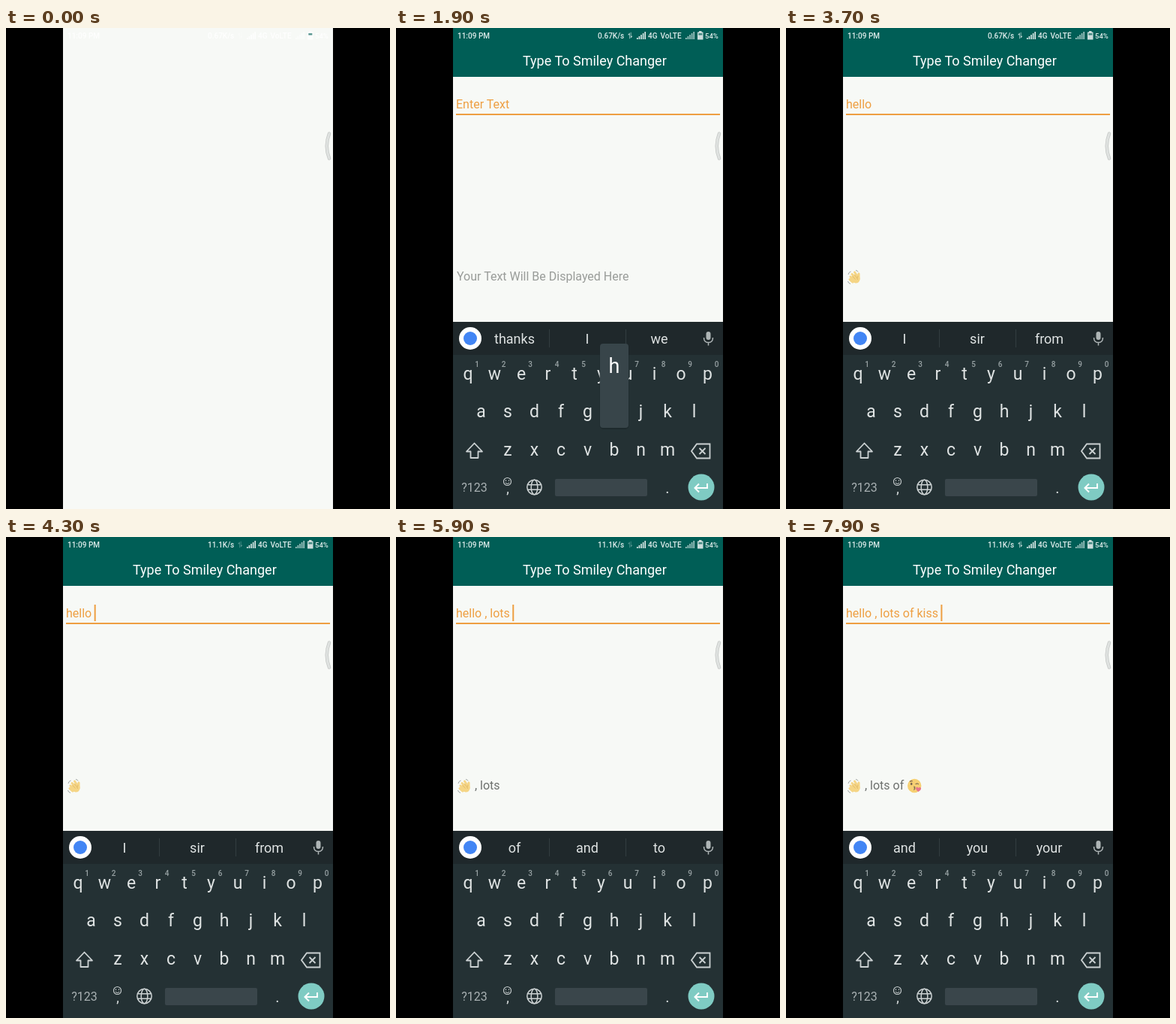
These frames come from a looping animation (512x640 px, 8 s). An HTML page:

```html
<!DOCTYPE html>
<html lang="en">
<head>
<meta charset="utf-8">
<title>Typing demo</title>
<style>
html, body { margin: 0; width: 100%; height: 100%; overflow: hidden; background: #000; }
svg { display: block; width: 100%; height: 100%; font-family: Roboto, sans-serif; }
text { white-space: pre; }
.mid { text-anchor: middle; }
.line { fill: none; stroke: #ccd2d3; stroke-width: 1.8; }
</style>
</head>
<body>
<svg viewBox="0 0 512 640">
  <defs>
    <clipPath id="screen"><rect x="76" width="360" height="640"/></clipPath>
    <g id="bars">
      <path d="M0 15v-2h1.6v2zM2.6 15v-4h1.6v4zM5.2 15v-6h1.6v6zM7.8 15V7h1.6v8zM10.4 15V5H12v10z"/>
    </g>
    <g id="wave" opacity=".85">
      <path d="M5 10L10 16M7 6.500L13 13M10.500 4L15 11M16 6L16 13M4 13.500L8 17" stroke="#f5cf72" stroke-width="3" stroke-linecap="round"/>
      <path d="M6 10L14 6.500Q18 9 17.500 14Q16 19 11.500 18.500Q8 17.500 5 14z" fill="#f5cf72"/>
      <path d="M7.500 9L11.500 13.500M10 7L14 12M15 9Q13 12 14.500 14" fill="none" stroke="#d9a94c" stroke-width=".8"/>
      <path d="M2 7Q2.500 4 5.500 3M12 1.500Q14 1.500 15 3.500M1.500 16Q2 18.500 5 19.500" fill="none" stroke="#8f9694" stroke-width="1"/>
    </g>
    <g id="kiss" opacity=".88">
      <circle cx="10" cy="10" r="9.200" fill="#f6cb62"/>
      <ellipse cx="6" cy="7.500" rx="1.300" ry="1.700" fill="#66503a"/>
      <path d="M11.500 8Q13.500 6 15.500 8M4 4.500Q5.500 3 7.500 4M9 11Q12 11.500 9.800 13Q12 14 9 15.500" fill="none" stroke="#66503a" stroke-width="1.100"/>
      <path d="M15 18Q10.500 14 12.500 12Q14.300 11 15.200 13Q17 11 18.800 12.700Q19.500 15.500 15 18z" fill="#e4647d"/>
    </g>
  </defs>
  <rect width="512" height="640"/>
  <g clip-path="url(#screen)">
    <rect x="76" width="360" height="640" fill="#f7f9f6"/>
    <g id="app">
      <rect x="76" width="360" height="65" fill="#005e56"/>
      <text x="169" y="49.500" font-size="18" fill="#fff">Type To Smiley Changer</text>
      <text id="input" x="80" y="107" font-size="16" fill="#ee9f42"></text>
      <rect x="80" y="114" width="352" height="2" fill="#ee9f42"/>
      <rect id="caret" y="90" width="2" height="22" fill="#ee9f42"/>
      <g id="output" font-size="16"></g>
      <rect x="76" y="592" width="360" height="48" fill="#005e56"/>
      <text class="mid" x="256.500" y="621" font-size="14" font-weight="500" fill="#fff">SHARE</text>
    </g>
    <g id="status" font-size="10" font-weight="500" fill="#fff">
      <text x="82" y="13.500">11:09 PM</text>
      <text id="speed" x="269" y="13.500"></text>
      <path id="arrows" d="M311 14V9h-2l2.700-3v8zM313.500 5.500v5h2l-2.700 3v-8z" transform="translate(0 .3)"/>
      <use href="#bars" x="321"/>
      <text x="336" y="13.500">4G</text>
      <text x="352.500" y="13.500">VoLTE</text>
      <use href="#bars" x="386" opacity=".75"/>
      <path d="M402 15.500V5.500h2v-1.500h3.500v1.500h2v10z" opacity=".9"/>
      <path d="M403.300 7h5v2.500h-5z" fill="#4d8e88"/>
      <text x="412" y="13.500" font-size="9.500">54%</text>
    </g>
    <path d="M431 140.500Q424.500 157 431 173.500" fill="none" stroke="#c3c6c4" stroke-width="4.500" stroke-linecap="round"/>
    <path d="M431 140.500Q424.500 157 431 173.500" fill="none" stroke="#dfe2e0" stroke-width="3" stroke-linecap="round"/>
    <g id="board">
      <rect x="76" y="391" width="360" height="249" fill="#243134"/>
      <rect x="76" y="391" width="360" height="44" fill="#1f282b"/>
      <circle cx="99" cy="413" r="15" fill="#fff"/>
      <circle cx="99" cy="413" r="9" fill="#4285f4"/>
      <path d="M204.500 401v24M306.500 401v24" stroke="#323d40"/>
      <g id="words" font-size="18" fill="#dfe3e3"></g>
      <rect x="413.500" y="404" width="6" height="11" rx="3" fill="#aeb5b6"/>
      <path d="M410.500 412q0 6.500 6 6.500t6-6.500M416.500 418.500v4" class="line" style="stroke:#aeb5b6;stroke-width:1.500"/>
      <rect id="erase" x="384" y="541" width="48" height="43" rx="4" fill="#37444a"/>
      <g id="keys"></g>
      <path class="line" d="M104.500 552.500l10.500 11h-5.500v8.500h-10v-8.500h-5.500z" stroke-linejoin="round"/>
      <path class="line" d="M401 553.500h17.500v19H401l-7-9.500zM404.500 559l8 8m0-8l-8 8"/>
      <text class="mid" x="104.500" y="617" font-size="16" fill="#a9b1b3">?123</text>
      <circle class="line" cx="148.500" cy="603.500" r="5" style="stroke-width:1.100"/>
      <path class="line" d="M146 605q2.500 3 5 0M146.500 601.500v1.500M150.500 601.500v1.500" style="stroke-width:1.100"/>
      <text class="mid" x="149" y="619" font-size="18" fill="#dfe3e3">,</text>
      <g class="line" style="stroke-width:1.500">
        <circle cx="184.500" cy="611" r="9.700"/>
        <ellipse cx="184.500" cy="611" rx="4.300" ry="9.700"/>
        <path d="M175.500 607.700h18M175.500 614.300h18"/>
      </g>
      <rect id="space" x="212" y="600" width="123" height="23" rx="2"/>
      <text class="mid" x="362" y="619" font-size="20" fill="#dfe3e3">.</text>
      <circle cx="407" cy="611" r="17.500" fill="#7fcbc3"/>
      <path d="M415 606v6h-16M404 606.500l-5.500 5.500 5.500 5.500" fill="none" stroke="#fff" stroke-width="2"/>
      <g id="popup">
        <rect x="-19.500" y="-91" width="39" height="114" rx="5" fill="#1b2629" opacity=".6"/>
        <rect x="-19" y="-91" width="38" height="112" rx="4" fill="#38454a"/>
        <text id="big" class="mid" y="-52" font-size="27" fill="#fff"></text>
      </g>
    </g>
  </g>
</svg>
<script>
const LOOP = 8000;
const $ = id => document.getElementById(id);
const pen = document.createElement('canvas').getContext('2d');
const width = s => { pen.font = '16px Roboto, sans-serif'; return pen.measureText(s).width; };
const show = (el, on) => el.setAttribute('visibility', on ? 'visible' : 'hidden');

// time, typed text, suggestions
const edits = [
  [400, '', 'thanks I we'],
  [2000, 'h', 'how hi have'],
  [2200, 'he', 'her he hey'],
  [2600, 'hel', 'help hello held'],
  [2800, 'hell', 'hell hello hello,'],
  [3200, 'hello ', 'I sir from'],
  [3900, 'hello n', 'no n now'],
  [4200, 'hello ', 'I sir from'],
  [4500, 'hello ,', 'I sir from'],
  [4700, 'hello , ', 'me to be'],
  [5200, 'hello , l', 'like l love'],
  [5400, 'hello , lo', 'love lo lol'],
  [5600, 'hello , lot', 'lots lot lot of'],
  [5800, 'hello , lots', 'lots, lots lot'],
  [5900, 'hello , lots ', 'of and to'],
  [6200, 'hello , lots o', 'on of or'],
  [6400, 'hello , lots of', 'off of often'],
  [6700, 'hello , lots of ', 'memories love fun'],
  [7100, 'hello , lots of k', 'know k kids'],
  [7300, 'hello , lots of ki', 'kids kind kisses'],
  [7500, 'hello , lots of kis', 'kisses kiss kids'],
  [7900, 'hello , lots of kiss ', 'and you your']
];
// key, pressed from, to
const presses = [
  ['h', 1900, 2000], ['e', 2100, 2300], ['l', 2500, 2600], ['l', 2700, 2800],
  ['n', 3800, 3900], ['del', 4200, 4300], [',', 4400, 4600], [' ', 4600, 4700],
  ['l', 5100, 5200], ['o', 5300, 5400], ['t', 5500, 5600], ['s', 5700, 5800],
  [' ', 5800, 5900], ['o', 6100, 6200], ['f', 6300, 6500], [' ', 6600, 6700],
  ['k', 7000, 7100], ['i', 7200, 7300], ['s', 7400, 7500]
];

const spots = { ',': [149, 611] };
let caps = '';
[['qwertyuiop', 96, 461], ['asdfghjkl', 113.5, 511], ['zxcvbnm', 149, 562]].forEach(([row, x0, y], r) => {
  [...row].forEach((ch, i) => {
    const x = x0 + i * 35.5;
    spots[ch] = [x, y];
    caps += `<text class="mid" x="${x}" y="${y + 7}" font-size="23" fill="#dfe3e3">${ch}</text>`;
    if (!r) caps += `<text class="mid" x="${x + 12}" y="451" font-size="10" font-weight="500" fill="#98a2a4">${(i + 1) % 10}</text>`;
  });
});
$('keys').innerHTML = caps;

function outputMarkup(text) {
  if (!text) return '<text x="81" y="336" fill="#999c99">Your Text Will Be Displayed Here</text>';
  let x = 81;
  return text.split(/(hello|kiss)/).map(part => {
    const icon = { hello: 'wave', kiss: 'kiss' }[part];
    const at = x;
    x += icon ? 20 : width(part);
    return icon ? `<use href="#${icon}" x="${at}" y="321"/>`
                : `<text x="${at}" y="336" fill="#6d706e">${part}</text>`;
  }).join('');
}

const wordMarkup = list => {
  const w = list === 'lots lot lot of' ? ['lots', 'lot', 'lot of'] : list.split(' ');
  return w.map((s, i) =>
    `<text class="mid" x="${[158, 255, 351][i]}" y="420"${s.length > 7 ? ' font-size="17"' : ''}>${s}</text>`).join('');
};

let last = null;
function draw(t) {
  const step = Math.floor(t / 100) * 100;
  $('app').setAttribute('opacity', step < 400 ? 0 : Math.min(1, (step - 300) / 300));
  $('status').setAttribute('opacity', step < 400 ? 0.9 : 0.88);

  const edit = edits.filter(e => e[0] <= t).pop() || edits[0];
  const [when, text, words] = edit;
  if (edit !== last) {
    $('input').textContent = text || 'Enter Text';
    $('output').innerHTML = outputMarkup(text);
    $('words').innerHTML = wordMarkup(words);
    last = edit;
  }
  $('caret').setAttribute('x', 80 + (text ? width(text) - 0.5 : 0));
  show($('caret'), t >= when && Math.floor((t - when) / 500) % 2 === 0);

  $('speed').textContent = t < 4300 ? '0.67K/s' : '11.1K/s';
  $('arrows').setAttribute('opacity', (t >= 1300 && t < 3900) || t >= 7200 ? 0.9 : 0.4);

  // keyboard slides up, easing out
  const p = Math.min(1, Math.max(0, (step - 1100) / 300));
  $('board').setAttribute('transform', `translate(0 ${250 * (1 - p) ** 2})`);
  show($('board'), p > 0);

  const press = presses.find(k => t >= k[1] && t < k[2]);
  const key = press ? press[0] : '';
  const spot = spots[key];
  $('popup').style.display = spot ? '' : 'none';
  if (spot) {
    $('popup').setAttribute('transform', `translate(${spot})`);
    $('big').textContent = key;
  }
  $('erase').style.display = key === 'del' ? '' : 'none';
  $('space').setAttribute('fill', key === ' ' ? '#4b575c' : '#3a464b');
}

const start = performance.now();
function tick() {
  draw((performance.now() - start) % LOOP);
  requestAnimationFrame(tick);
}
tick();
</script>
</body>
</html>
```
